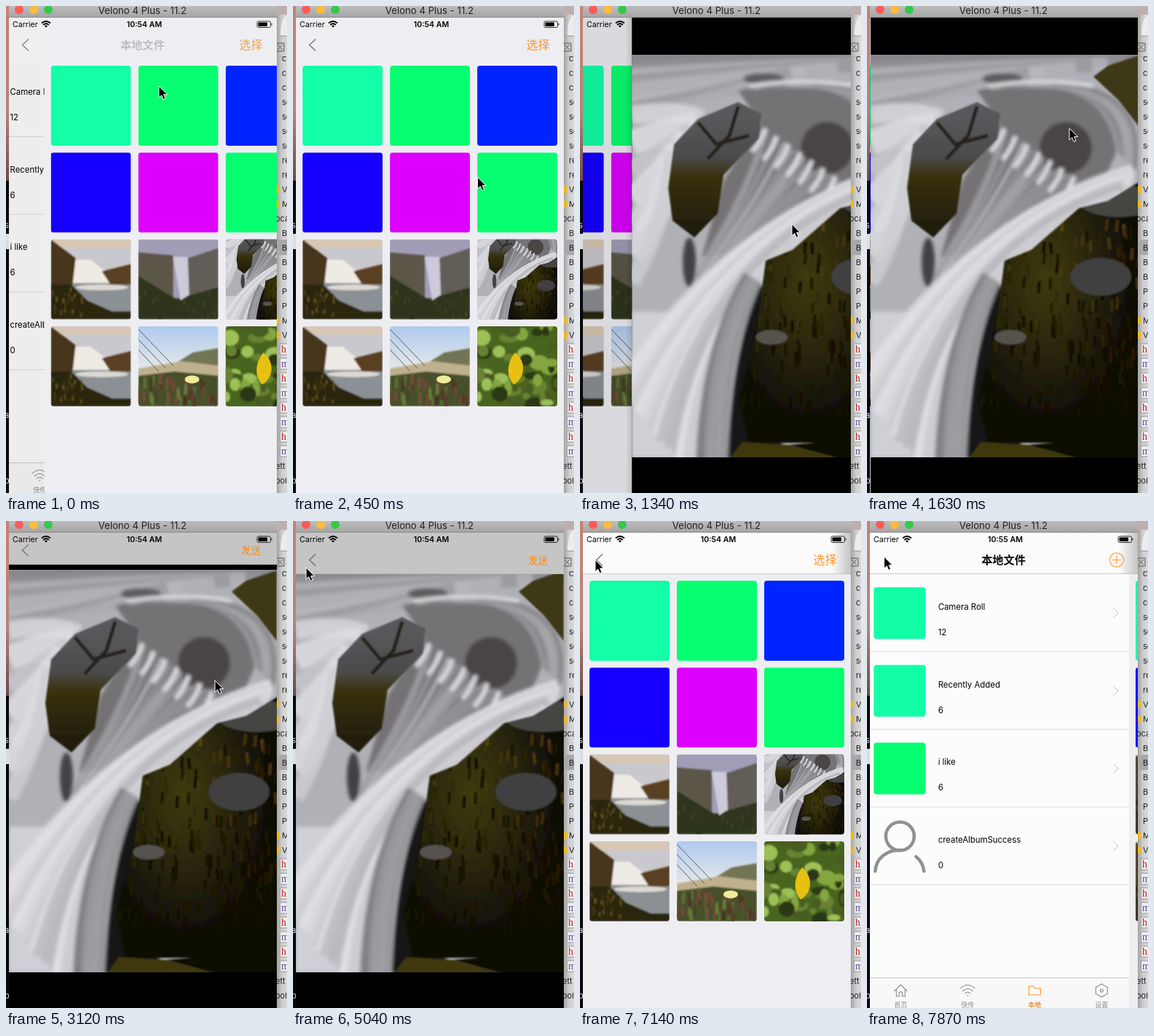
Animation, 386 px wide and 669 px high, one loop 8000 ms. Source, as an HTML page:

```html
<!DOCTYPE html>
<html lang="zh">
<head>
<meta charset="utf-8">
<style>
html, body { margin: 0; width: 100%; height: 100%; overflow: hidden; background: #000; }
svg { display: block; width: 386px; height: 669px; }
text { font-family: Inter, "Noto Sans CJK SC", "Noto Sans CJK", sans-serif; white-space: pre; }
.file { font-family: "Liberation Serif", serif; }
</style>
</head>
<body>
<svg id="stage" viewBox="0 0 386 669"></svg>
<script>
let seed = 7;
const rnd = () => (seed = seed * 16807 % 2147483647) / 2147483647;
const W = 368, ORANGE = '#ff9326';

// ---- markup helpers ----
const rect = (x, y, w, h, fill, more = '') => `<rect x="${x}" y="${y}" width="${w}" height="${h}" fill="${fill}" ${more}/>`;
const oval = (x, y, rx, ry, fill, more = '') => `<ellipse cx="${x}" cy="${y}" rx="${rx}" ry="${ry}" fill="${fill}" ${more}/>`;
const shape = (d, fill, more = '') => `<path d="${d}" fill="${fill}" ${more}/>`;
const line = (d, color, w = 1, more = '') => `<path d="${d}" fill="none" stroke="${color}" stroke-width="${w}" ${more}/>`;
const text = (x, y, size, s, more = '') => `<text x="${x}" y="${y}" font-size="${size}" ${more}>${s}</text>`;
const at = (x, y, body, more = '') => `<g transform="translate(${x} ${y})" ${more}>${body}</g>`;
const fx = (name, body) => `<g filter="url(#${name})">${body}</g>`;
const times = (n, f) => Array.from({ length: n }, (_, i) => f(i)).join('');
const mid = 'text-anchor="middle"';

// n soft strands of water blended from quadratic a to quadratic b, grey between lo and hi
const fan = (a, b, n, w, lo, hi) => times(n, i => {
  const [x, y, ...to] = a.map((v, k) => Math.round(v + (b[k] - v) * i / (n - 1)));
  const c = Math.round(lo + (hi - lo) * rnd());
  return line(`M${x} ${y}Q${to}`, `rgb(${c},${c},${c + 5})`, w * (.6 + rnd()), 'stroke-opacity=".8"');
});
// n blades of growth scattered over a box
const blades = (n, x, y, w, h, len, color) => times(n, () => {
  const u = rnd(), v = rnd();
  return line(`M${(x + w * u).toFixed(1)} ${(y + h * v).toFixed(1)}l${(rnd() * 4 - 2).toFixed(1)} ${len}`, color(u, v), len / 4);
});
const hsl = (h, s, l) => `hsl(${h.toFixed()},${s}%,${l.toFixed()}%)`;

// ---- pictures ----
const ROCK = 'M376 240L330 268 290 278 225 335 188 350 176 440 152 540 165 600 H376Z';
const torrent = rect(4, 67, W, 553, '#b0b1b7') + fx('soft',
  fan([0, 75, 150, 70, 372, 72], [0, 150, 120, 125, 200, 95], 9, 14, 125, 200) +
  fan([4, 150, 60, 140, 100, 155], [4, 380, 50, 300, 60, 200], 7, 24, 195, 225) +
  shape('M150 116Q240 92 330 125L350 180 325 240 200 335 100 345 130 240 180 160Z', '#747275') +
  oval(272, 195, 36, 36, '#484544') + oval(185, 100, 28, 8, '#5d5d5f') +
  fan([170, 112, 330, 85, 345, 200], [250, 106, 385, 110, 366, 225], 6, 8, 125, 175) +
  line('M165 110Q240 98 310 110', '#dcdce0', 5) +
  fan([188, 170, 165, 260, 85, 380], [290, 242, 235, 245, 150, 345], 9, 8, 125, 195) +
  times(7, i => line(`M${187 + i * 16} ${168 + i * 11}q-4 16 -18 32`, '#dcdce2', 6)) +
  oval(83, 352, 9, 34, '#424244') + rect(4, 420, 90, 200, '#cfd0d6') +
  fan([365, 225, 148, 288, -20, 520], [345, 265, 108, 348, 85, 640], 16, 19, 180, 230) +
  fan([165, 370, 105, 470, 100, 630], [180, 380, 130, 470, 132, 630], 4, 11, 105, 160) +
  shape('M180 385Q142 470 136 622H210V380Z', '#131313')) +
  fx('fine',
    shape('M62 190L95 155 150 132 182 148 178 182 130 232 122 285 90 318 60 295 54 250Z', 'url(#slab)') +
    line('M150 138L138 178 108 210M95 160L120 190 165 178', '#25231d', 5) +
    shape('M310 97L330 82 372 68V165L345 130Z', '#3d3812') +
    shape(ROCK, '#0d0c07') +
    `<g clip-path="url(#rock)">${rect(150, 240, 226, 380, 'url(#moss)')}` +
    blades(260, 155, 290, 220, 270, 16, (u, v) => hsl(62 - 26 * u, 75, 3 + 20 * rnd() * (1 - v))) +
    oval(345, 268, 55, 22, '#454443') + oval(320, 372, 42, 26, '#3f3f41') + oval(196, 455, 22, 10, '#56524f') + '</g>' +
    shape('M138 622L155 599 220 603 290 622Z', '#3f390d') + shape('M220 603L290 622H376V590Z', '#080806'));

const sunset = rect(0, 0, 110, 110, '#c9c8ce') + fx('fine',
  rect(0, 0, 110, 12, '#d8c7b4') + shape('M28 28H55L80 48V62H28Z', '#eeeae4') + rect(28, 60, 82, 40, '#8b9094') +
  oval(70, 66, 36, 4, '#dcd8d2') + shape('M0 0L34 26 30 62 0 68Z', '#46351d') + shape('M70 44L110 34V62H82Z', '#5a4022') +
  shape('M0 62H28L50 84 84 99H110V110H0Z', '#2c270f') +
  blades(40, 2, 66, 45, 36, 6, () => hsl(45, 50, 8 + 25 * rnd())));

const misty = rect(0, 0, 110, 110, '#a29db6') + fx('fine',
  shape('M0 18L48 22V80H0Z', '#5c5749') + shape('M68 26L110 12V90H70Z', '#625d57') +
  shape('M0 50L52 82 110 66V110H0Z', '#2e351b') + blades(30, 0, 70, 110, 36, 6, () => hsl(75, 35, 10 + 18 * rnd())) +
  shape('M48 24H68L70 76 58 84Z', '#cdcada'));

const dunes = rect(0, 0, 110, 110, 'url(#sky)') + fx('fine',
  shape('M40 58L75 36 110 30V70H30Z', '#717452') + shape('M0 58L60 48 110 54V76H0Z', '#bfb18d') +
  shape('M0 68L50 62 110 68V110H0Z', '#46502a') +
  blades(60, 0, 64, 110, 36, 14, u => hsl(u * 500 % 2 < 1 ? 78 : 16, 35, 18 + 20 * rnd()))) +
  times(3, i => line(`M0 ${4 + i * 14}l${48 - i * 10} ${50 - i * 10}`, '#525048', .9)) + oval(74, 73, 10, 5.5, '#eeeb9c');

const leaf = rect(0, 0, 110, 110, '#48641e') + fx('fine',
  times(44, i => oval(Math.round(110 * rnd()), Math.round(110 * rnd()), 4 + 10 * rnd(), 4 + 8 * rnd(), hsl(80, 45, 15 + i % 5 * 10)))) +
  shape('M52 36C68 48 66 72 50 80C38 66 42 48 52 36Z', '#e7c012');

// ---- views ----
const cell = (body, i) => at(13 + i % 3 * 120, 82 + Math.floor(i / 3) * 119.3, body, 'clip-path="url(#cell)"');
const swatches = ['#12ffa7', '#06ff70', '#0024ff', '#1500ff', '#dd00ff', '#06ff70'];
const thumb = '<use href="#torrent" transform="translate(55 55) scale(.299) translate(-188 -343.5)"/>';
const cells = [...swatches.map(c => rect(0, 0, 110, 110, c)), sunset, misty, thumb, sunset, dunes, leaf];

const person = line('M2 70C3 52 18 41 36 41M58 50C64 55 68 62 69 70', '#919191', 4.5, 'stroke-linecap="round"') +
  oval(36, 22, 19.5, 19.5, 'none', 'stroke="#919191" stroke-width="4.5"');
const albums = [['Camera Roll', 12, '#12ffa7'], ['Recently Added', 6, '#12ffa7'], ['i like', 6, '#06ff70'], ['createAlbumSuccess', 0]];
const row = ([name, count, color], i) => at(0, 106.7 * i,
  (color ? rect(13, 91, 71, 71, color, 'rx="4"') : at(13, 91, person)) +
  text(101.3, 122, 11.4, name) + text(101.3, 157, 11.4, count) +
  line('M342 120l7 6.5 -7 6.5', '#c4c4c8') + rect(0, 179, 380, 1, '#dedee2'));

const tabs = [
  ['首页', 'M-9 1L0 -8 9 1M-6 -1V8H-2V2H2V8H6V-1'],
  ['快传', 'M-10 -3Q0 -12 10 -3M-7 1Q0 -6 7 1M-4 4.5Q0 0 4 4.5M-1 7H1'],
  ['本地', 'M-8 6V-6H-2L0 -3H8V6Z'],
  ['设置', 'M0 -9L8 -4.5V4.5L0 9 -8 4.5V-4.5ZM-2 0a2 2 0 1 0 4 0a2 2 0 1 0 -4 0']];
const tabBar = rect(0, 628, 380, 41, '#f9f9f9') + rect(0, 627, 380, 1, '#c8c8c8') + tabs.map(([name, d], i) => {
  const c = i === 2 ? ORANGE : '#8c8c8c';
  return at(50 + 92 * i, 645, line(d, c, 1.1) + text(0, 22.5, 9, name, `${mid} fill="${c}" font-weight="${i === 2 ? 700 : 400}"`));
}).join('');

// ---- desktop behind the window: * marks a folder, - an outdented row ----
const sideRows = 'c,co,co,se,se,se,se,re,re,*V,*M,-oca,B,B,B,B,P,P,*M,*V,h,m,h,m,h,m,h,m,-ett,-ool'.split(',');
const sideRow = (s, i) => {
  const y = 76 + 20 * i;
  if (s === 'h' || s === 'm') return rect(376.5, y - 12, 12, 15, '#eee', 'stroke="#999"') +
    text(378, y, 14, s, `class="file" fill="${s === 'h' ? '#c01818' : '#5a4a9c'}"`);
  return (s[0] === '*' ? rect(370, y - 9, 6, 10, '#f0b91c') : '') +
    text(s[0] === '-' ? 370 : 379, y, 11, s.replace(/[*-]/, ''), 'fill="#222"');
};
const desktop = rect(0, 0, 6, 240, 'url(#dusk)') + rect(0, 240, 6, 429, '#0b0908') + rect(0, 313, 4, 21, '#ddd') +
  [['s', 305], ['i', 430], ['a', 566], ['b', 656]].map(([s, y]) => text(-2, y, 11, s, 'fill="#ddd"')).join('') +
  rect(372, 0, 14, 669, 'url(#side)') + rect(372, 0, 14, 12, '#bfaeb0') + rect(372, 41, 14, 1, '#a5a5a5') +
  shape('M386 12Q377 17 377 40H386Z', '#ececec') + rect(372, 69, 14, 1, '#aaa') + rect(372, 321, 14, 21, '#a8a8a8') +
  line('M371 51H382V62H371ZM373 53l7 7m0 -7l-7 7', '#555') + sideRows.map(sideRow).join('');

const status = text(9, 29, 10.6, 'Carrier') +
  line('M49 23.5Q55 18.5 61 23.5M51.2 26Q55 22.6 58.8 26', '#000', 1.8) + shape('M53 27.4Q55 25.8 57 27.4L55 29.6Z', '#000') +
  text(190, 29, 10.6, '', `${mid} font-weight="600" id="clock"`) +
  rect(345, 21, 18.5, 8.5, 'none', 'rx="2" stroke="#000" stroke-width=".8"') + rect(346.5, 22.5, 12.5, 5.5, '#000', 'rx="1"') +
  shape('M364.6 23.5Q366.6 25.2 364.6 27Z', '#000');

const bar = `<g id="barFill">${rect(4, 0, W, 73, '#fbfbfc')}<g id="shade">${rect(-22, 0, 420, 73, 'url(#feather)')}</g>${rect(4, 72, W, 1, '#adadb0', 'opacity=".6"')}</g>` +
  line('M31 45.5L22.5 53.5 31 61.5', '#6c6c6c', 1.2, 'id="back"') +
  text(187.5, 59, 15.2, '本地文件', `${mid} font-weight="600" id="title"`) +
  text(336.5, 59, 16, '选择', `${mid} fill="${ORANGE}" id="pick"`) +
  text(336.5, 58.5, 13.5, '发送', `${mid} fill="#ff8a10" id="send"`) +
  `<g id="plus">${oval(343, 53.5, 9.6, 9.6, 'none', `stroke="${ORANGE}" stroke-width="1.2"`)}${line('M337 53.5H349M343 47.5V59.5', ORANGE, 1.2)}</g>`;

const stops = list => list.map(([o, c, a = 1]) => `<stop offset="${o}" stop-color="${c}" stop-opacity="${a}"/>`).join('');
const across = (id, ...s) => `<linearGradient id="${id}">${stops(s)}</linearGradient>`;
const down = (id, ...s) => `<linearGradient id="${id}" x2="0" y2="1">${stops(s)}</linearGradient>`;
const blur = (id, r) => `<filter id="${id}"><feGaussianBlur stdDeviation="${r}"/></filter>`;
const clip = (id, body) => `<clipPath id="${id}">${body}</clipPath>`;

const $ = id => document.getElementById(id);
$('stage').innerHTML = `<defs>
  ${clip('screen', rect(4, 16, W, 653))}${clip('cell', rect(0, 0, 110, 110, '#000', 'rx="4"'))}
  ${clip('frame', rect(4, 67, W, 553))}${clip('rock', shape(ROCK))}
  ${down('dusk', [0, '#c98073'], [.6, '#b98378'], [1, '#6d4a45'])}
  ${down('chrome', [0, '#bcbcbc'], [1, '#a4a4a4'])}
  ${down('slab', [.1, '#59595c'], [.4, '#4c4b4b'], [.55, '#38310f'], [1, '#1d190b'])}
  ${down('sky', [0, '#aecaee'], [.5, '#e2e6ea'])}
  ${across('side', [0, '#a3a3a3'], [.5, '#cdcdcd'], [1, '#d9d9d9'])}
  ${across('edge', [0, '#000', 0], [1, '#000', .12])}
  ${across('feather', [0, '#c5c5c6', 0], [.06, '#c5c5c6'])}
  <radialGradient id="moss" cx=".42" cy=".35" r=".55">${stops([[0, '#3d3b0a'], [.5, '#2a260a'], [1, '#0b0a06']])}</radialGradient>
  ${blur('soft', 2.4)}${blur('fine', .9)}
  <g id="torrent"><g clip-path="url(#frame)">${torrent}</g></g>
</defs>
${desktop}
<g clip-path="url(#screen)">
  ${rect(4, 16, W, 653, '#efeff2')}
  <g id="list">${rect(4, 73, W, 596, '#fdfdfd')}${albums.map(row).join('')}${tabBar}${rect(4, 73, W, 596, '#000', 'id="listDim"')}</g>
  <g id="grid">${rect(4, 16, W, 653, '#eeeef2')}${cells.map(cell).join('')}${rect(4, 16, W, 653, '#000', 'id="gridDim"')}</g>
  <g id="preview">${rect(-5, 16, 9, 653, 'url(#edge)')}${rect(4, 16, W, 653, '#000')}<use href="#torrent"/></g>
  <g id="bar">${bar}</g>
  ${status}
</g>
${rect(4, 0, W, 16, 'url(#chrome)')}${rect(4, 15, W, 1, '#8d8d8d')}
${['#fc5b57', '#fdbc3f', '#34c84a'].map((c, i) => oval(18 + 20 * i, 5, 6, 6, c)).join('')}
${text(187.5, 10.5, 13.2, 'Velono 4 Plus - 11.2', mid + ' fill="#222"')}
<g id="cursor">${shape('M0 0V16L3.7 12.7 6.2 18.4 9 17.2 6.6 11.6H11.5Z', '#000', 'stroke="#fff"')}</g>`;

// ---- motion ----
const LOOP = 8000, STEP = 148.4;
const PUSH = 1148, BAR = 2990, POP = 6242, LEAVE = 7550;
const spring = ms => { const x = Math.max(0, ms) * .0166; return 1 - (1 + x) * Math.exp(-x); };
const clamp = v => Math.min(1, Math.max(0, v));

// pointer legs: start, end, x, y of the goal
const legs = [[0, 890, 297, 360], [1160, 1630, 278, 168], [1950, 2370, 293, 82], [2560, 2820, 287, 219],
  [3420, 4150, 321, 50], [4460, 5040, 18, 64], [5850, 5935, 19.5, 56], [7000, 7300, 23.5, 49]];
function pointer(t) {
  let x = 210, y = 110;
  for (const [from, to, gx, gy] of legs) {
    const u = clamp((t - from) / (to - from)), e = u * u * (3 - 2 * u);
    x += (gx - x) * e;
    y += (gy - y) * e;
  }
  return [x, y];
}
const move = (id, x, y = 0) => $(id).setAttribute('transform', `translate(${x.toFixed(2)} ${y.toFixed(2)})`);
const fade = (id, o) => $(id).setAttribute('opacity', o.toFixed(3));
const show = (id, on) => $(id).style.display = on ? '' : 'none';

function draw(t) {
  // how far the grid (q) and the preview (r) are off to the right
  const q = t < LEAVE ? 1 - spring(t + 213) : spring(t - LEAVE);
  const r = t < POP ? 1 - spring(t - PUSH) : spring(t - POP);
  move('list', -.3 * W * (1 - q));
  move('grid', W * q - .3 * W * (1 - r));
  move('preview', W * r);
  fade('listDim', .07 * (1 - q));
  fade('gridDim', .1 * (1 - r));
  show('preview', r < .999);

  move('bar', 0, t > PUSH ? -57 * (1 - clamp((t - BAR) / 165)) : 0);
  show('bar', t < PUSH || t > BAR);
  show('barFill', t > BAR);
  move('shade', W * r);
  fade('back', 1 - q);
  fade('title', q ** .8);
  fade('pick', (1 - q) * r);
  fade('send', (1 - r) ** 2);
  fade('plus', q ** 3);
  $('clock').textContent = t < 7400 ? '10:54 AM' : '10:55 AM';
  move('cursor', ...pointer(t));
}

// the screen refreshes in fixed steps
const start = performance.now();
let last = -1;
function tick() {
  const t = (performance.now() - start) % LOOP;
  const n = Math.min(53, Math.floor((t + 8) / STEP));
  if (n !== last) draw((last = n) * STEP);
  requestAnimationFrame(tick);
}
tick();
</script>
</body>
</html>
```
